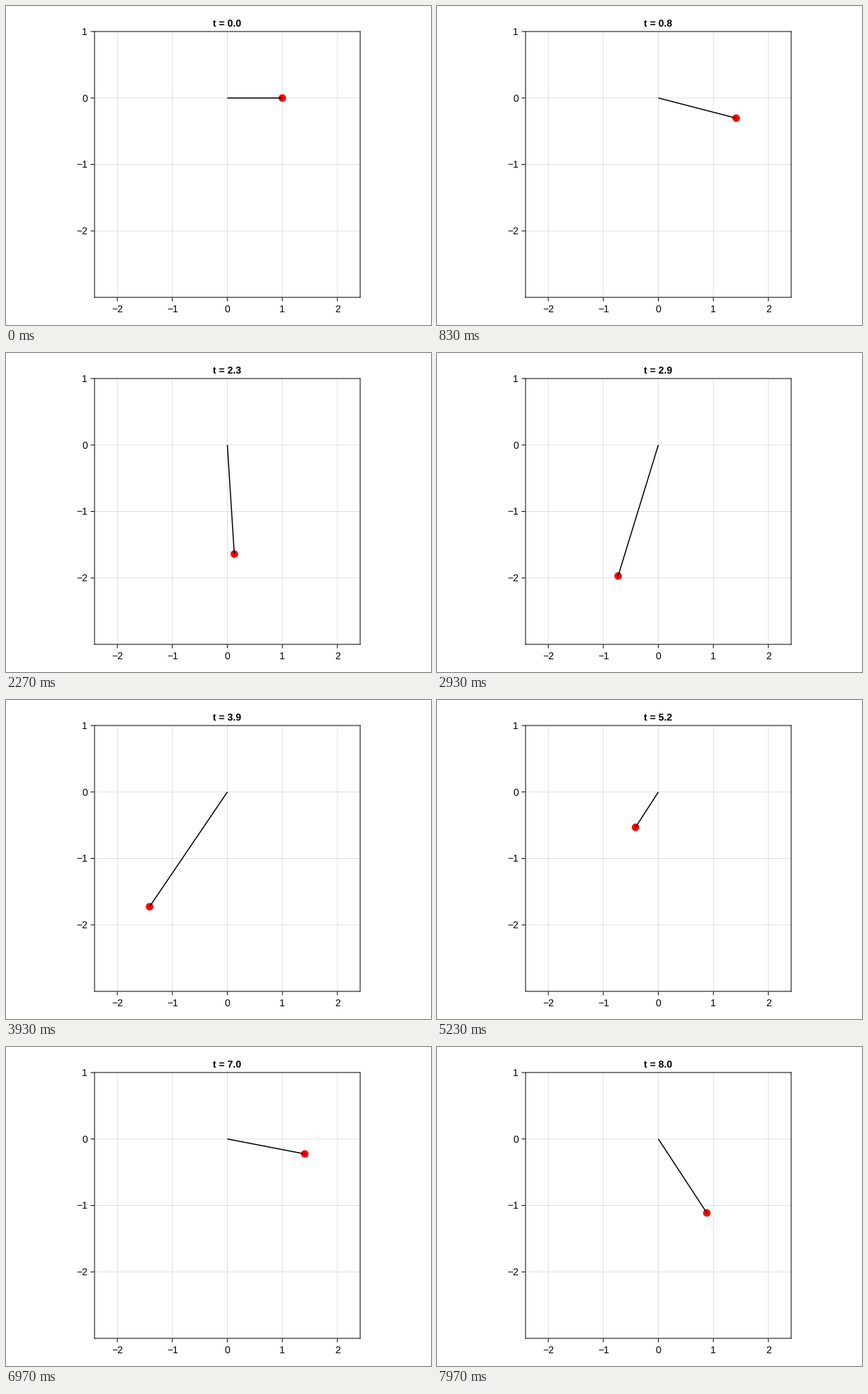
These frames come from a looping animation (600 px wide and 450 px high, 8 s). A matplotlib script:

```python
import math

import matplotlib.pyplot as plt
from matplotlib.animation import FuncAnimation
from matplotlib.patches import Circle

W, H, DPI = 600, 450, 100
FPS, FRAMES = 30, 240
LEFT, TOP, SIZE = 125, 36, 375
RIGHT, BOTTOM = LEFT + SIZE, TOP + SIZE
X_MAX = 1 + math.sqrt(2)
Y_MIN, Y_MAX = -3, 1
PX = 72 / DPI  # points per pixel

plt.rcParams["font.family"] = "Liberation Sans"
plt.rcParams["text.hinting"] = "none"

fig = plt.figure(figsize=(W / DPI, H / DPI), dpi=DPI, facecolor="white")
ax = fig.add_axes([0, 0, 1, 1])
ax.set_xlim(0, W)
ax.set_ylim(H, 0)
ax.axis("off")


def to_px(x, y):
    return (LEFT + (x + X_MAX) / (2 * X_MAX) * SIZE,
            TOP + (Y_MAX - y) / (Y_MAX - Y_MIN) * SIZE)


def stroke(xs, ys, width=1, cap="butt", **style):
    line, = ax.plot(xs, ys, lw=width * PX, solid_capstyle=cap,
                    snap=False, **{"color": "black", **style})
    return line


def label(x, y, text, ha, **style):
    return ax.text(x, y, text, ha=ha, va="baseline", fontsize=14 * PX,
                   color="black", **style)


def tick_text(v):
    return str(v).replace("-", "\u2212")


def position(t):
    """Mass on a zero-length spring under unit gravity."""
    return math.cos(t) + math.sin(t), math.cos(t) - 1


GRID = dict(alpha=0.12, zorder=1)
for v in range(-2, 3):
    x, _ = to_px(v, 0)
    stroke([x, x], [TOP, BOTTOM], **GRID)
    stroke([x, x], [BOTTOM + 0.5, BOTTOM + 5.5], zorder=5)
    label(x, 432, tick_text(v), "center")

for v in range(-2, 2):
    _, y = to_px(0, v)
    if v < Y_MAX:
        stroke([LEFT, RIGHT], [y, y], **GRID)
    stroke([LEFT - 5.5, LEFT - 0.5], [y, y], zorder=5)
    label(115, y + 5, tick_text(v), "right")

for x in (LEFT, RIGHT):
    stroke([x, x], [TOP, BOTTOM], cap="projecting", zorder=5)
for y in (TOP, BOTTOM):
    stroke([LEFT, RIGHT], [y, y], cap="projecting", zorder=5)

pivot = to_px(0, 0)
title = label(292.4, 29, "", "left", fontweight="bold")
ball = Circle(pivot, 5.3, facecolor="red", edgecolor="none", zorder=3)
ax.add_patch(ball)
rod = stroke([], [], 1.5, zorder=4)


def update(i):
    t = i / FPS
    x, y = to_px(*position(t))
    title.set_text(f"t = {t:.1f}")
    ball.center = x, y
    rod.set_data([pivot[0], x], [pivot[1], y])
    return title, ball, rod


anim = FuncAnimation(fig, update, frames=FRAMES, interval=1000 / FPS,
                     repeat=True, repeat_delay=0, blit=False)
plt.show()
```
